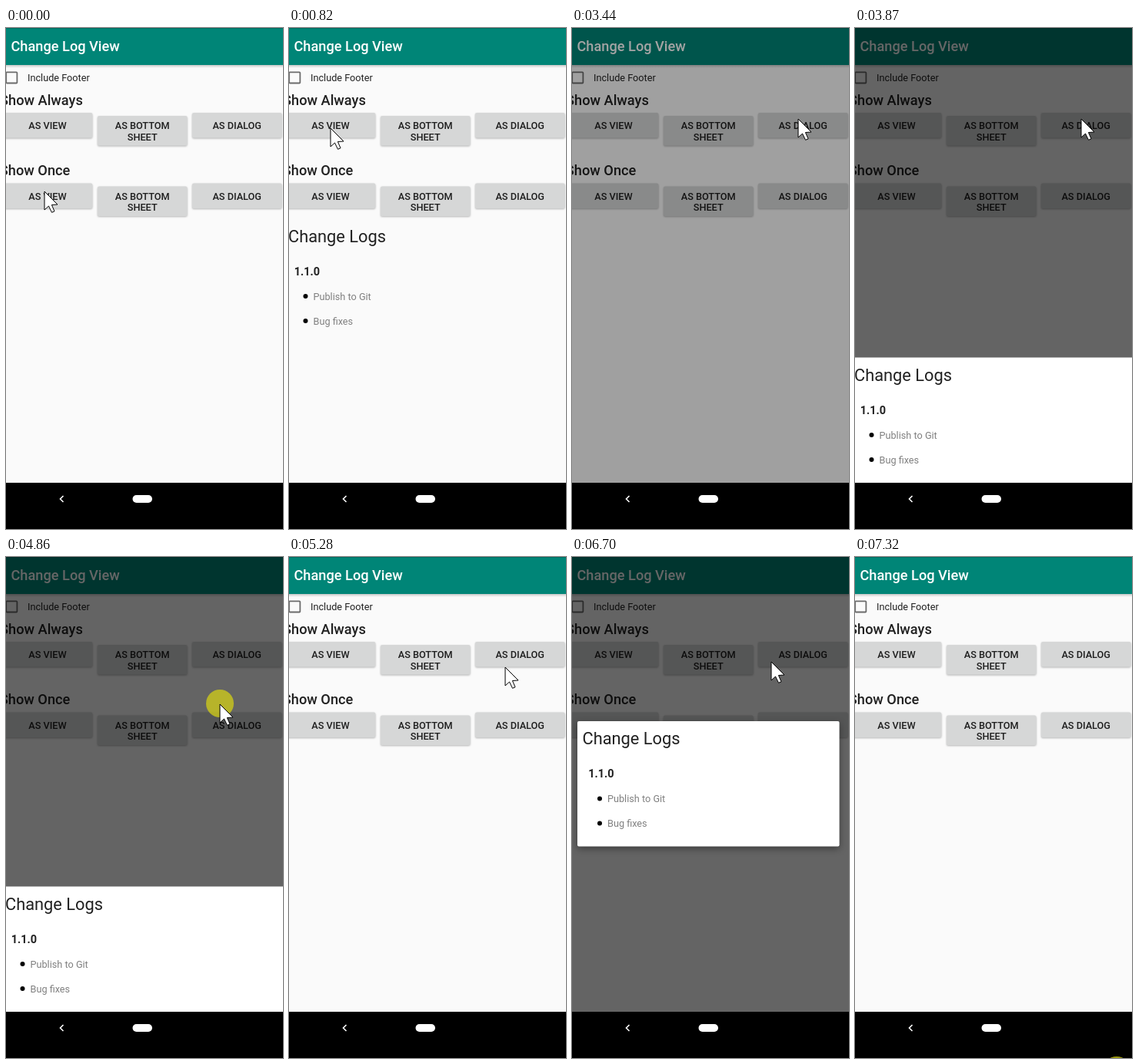
Recreate the animation shown at these times as an HTML page. Size 360 by 650 pixels, loop 7.52 s.

```html
<!DOCTYPE html>
<html lang="en">
<head>
<meta charset="utf-8">
<title>Change Log View</title>
<style>
  html, body { margin: 0; width: 100%; height: 100%; overflow: hidden; background: #000; }
  svg { display: block; width: 360px; height: 650px; font-family: Roboto, sans-serif; }
  text { white-space: pre; }
  .label { font-size: 12.7px; font-weight: 500; text-anchor: middle; fill: #1f1f1f; }
  .head { font-size: 18.2px; font-weight: 500; text-anchor: end; fill: #212121; }
  .body { font-size: 12.7px; fill: #808080; }
  .button { fill: #d6d7d7; filter: drop-shadow(0 1px 1px rgba(0,0,0,.28)); }
  .card { fill: #fff; }
  #dialog .card { filter: drop-shadow(0 3px 5px rgba(0,0,0,.4)); }
</style>
</head>
<body>
<svg viewBox="0 0 360 650">
  <defs>
    <linearGradient id="shade" x2="0" y2="1">
      <stop stop-color="#000" stop-opacity=".2"/>
      <stop offset="1" stop-color="#000" stop-opacity="0"/>
    </linearGradient>
    <g id="logs">
      <text x="-1" y="457.8" font-size="21.8" fill="#212121">Change Logs</text>
      <text x="6.7" y="500.5" font-size="14.5" font-weight="700" fill="#212121">1.1.0</text>
      <circle cx="21.5" cy="528" r="3"/>
      <text class="body" x="31.5" y="532.5">Publish to Git</text>
      <circle cx="21.5" cy="560" r="3"/>
      <text class="body" x="31.5" y="564.5">Bug fixes</text>
    </g>
  </defs>

  <rect width="360" height="590" fill="#fafafa"/>
  <rect y="48" width="360" height="4" fill="url(#shade)"/>
  <rect width="360" height="48" fill="#008577"/>
  <rect width="360" height="1" fill="#006b60"/>
  <text x="6.5" y="30.4" font-size="18.2" font-weight="500" fill="#fff">Change Log View</text>
  <rect x=".2" y="57.3" width="14.2" height="14.2" rx="1" fill="none" stroke="#6b6b6b" stroke-width="1.8"/>
  <text x="28" y="69.4" font-size="12.7" fill="#212121">Include Footer</text>
  <text class="head" x="99.8" y="99.5">Show Always</text>
  <text class="head" x="83.3" y="191">Show Once</text>
  <g id="buttons"></g>

  <use id="inline" href="#logs" y="-180"/>
  <rect id="scrim" width="360" height="590"/>
  <g id="sheet">
    <rect class="card" y="427.5" width="360" height="163"/>
    <use href="#logs"/>
  </g>
  <g id="dialog">
    <rect class="card" x="7" y="213" width="340.5" height="162.5" rx="2"/>
    <use href="#logs" x="14.5" y="-214.5"/>
  </g>

  <rect y="590" width="360" height="60"/>
  <path d="M74.5 607l-4 4 4 4" fill="none" stroke="#fff" stroke-width="1.6"/>
  <rect x="164.5" y="606" width="25.5" height="10" rx="5" fill="#fff"/>

  <g id="pointer">
    <circle id="tap" cy="-1" r="18" fill="rgb(215,211,20)" fill-opacity=".72"/>
    <path d="M0 0V24L5.5 19 9.5 27.3 13 25.8 9.4 17.5 17 17Z" fill="#fff" stroke="#000"/>
  </g>
</svg>
<script>
const $ = id => document.getElementById(id);
const LOOP = 7520;

const button = (x, y, h, lines) =>
  `<rect class="button" x="${x}" y="${y}" width="116.5" height="${h}" rx="2"/>` +
  lines.map((s, i) => `<text class="label" x="${x + 58.2}" y="${y + (h > 35 ? 17 : 21) + i * 14.6}">${s}</text>`).join('');

const row = dy =>
  button(-4.2, 110 + dy, 32.5, ['AS VIEW']) +
  button(119, 114 + dy, 38.5, ['AS BOTTOM', 'SHEET']) +
  button(242, 110 + dy, 32.5, ['AS DIALOG']);

$('buttons').innerHTML = row(0) + row(91.5);
const faces = document.querySelectorAll('.button');

// Each step changes part of the state; at = pointer tip, press = button index
const steps = [
  [0, { at: [50, 212], press: -1, tap: 0, inline: 0, scrim: 0, sheet: 0, dialog: 0 }],
  [200, { at: [53, 158] }],
  [400, { at: [54, 130], press: 0 }],
  [610, { inline: 1 }],
  [820, { press: -1 }],
  [1620, { at: [58, 129], press: 0 }],
  [1820, { at: [88, 130], press: -1, inline: 0 }],
  [2020, { at: [150, 128] }],
  [2220, { at: [166, 127], press: 1 }],
  [2620, { at: [165, 128], press: -1 }],
  [2820, { at: [217, 142] }],
  [3240, { at: [270, 125] }],
  [3440, { at: [294, 118], scrim: .36 }],
  [3660, { scrim: .55, sheet: .7 }],
  [3870, { scrim: .6, sheet: 1 }],
  [4470, { at: [296, 330] }],
  [4670, { at: [290, 605] }],
  [4860, { at: [278, 191], tap: 1 }],
  [5060, { at: [279, 170], tap: 0, scrim: .3, sheet: .4 }],
  [5280, { at: [281, 143], scrim: 0, sheet: 0 }],
  [5470, { at: [285, 127] }],
  [5670, { tap: 1, press: 2 }],
  [5870, { tap: 0 }],
  [6080, { press: -1, scrim: .4, dialog: .6 }],
  [6290, { scrim: .6, dialog: 1 }],
  [6500, { at: [270, 131] }],
  [6700, { at: [259, 136] }],
  [6900, { at: [300, 430] }],
  [7110, { at: [328, 580], scrim: .25, dialog: .3 }],
  [7320, { at: [340, 667], tap: 1, scrim: 0, dialog: 0 }],
];

function draw(now) {
  const t = now % LOOP;
  const s = Object.assign({}, ...steps.filter(([start]) => start <= t).map(([, change]) => change));
  faces.forEach((face, i) => face.style.fill = i === s.press ? '#bbbcbc' : '');
  for (const id of ['inline', 'scrim', 'dialog', 'tap']) $(id).style.opacity = s[id];
  $('sheet').setAttribute('transform', `translate(0 ${(1 - s.sheet) * 163})`);
  $('pointer').setAttribute('transform', `translate(${s.at})`);
}

const begin = performance.now();
function tick() {
  draw(performance.now() - begin);
  requestAnimationFrame(tick);
}
tick();
</script>
</body>
</html>
```
